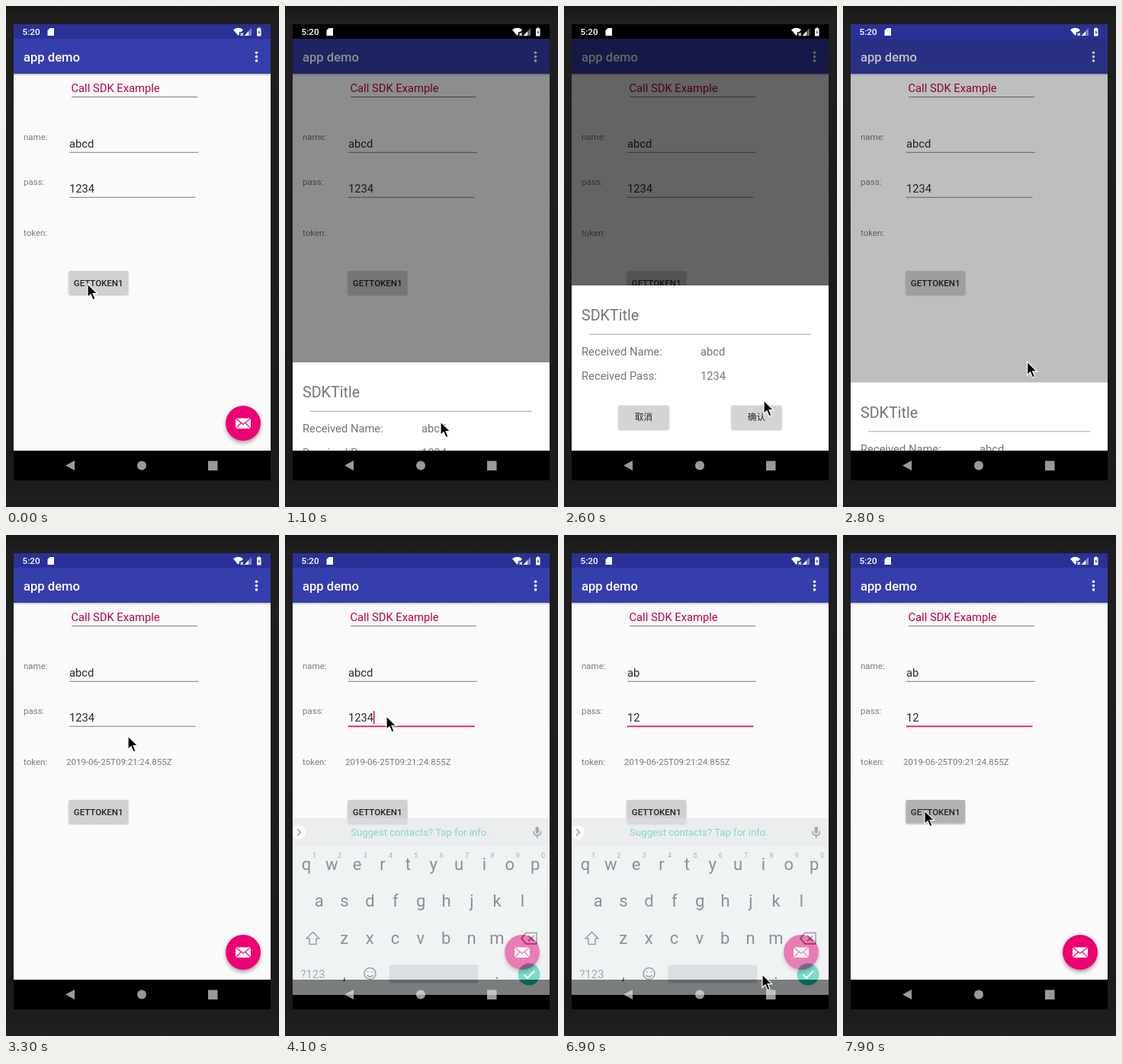
Recreate the animation shown at these times as an HTML page. Size 358 by 658 pixels, loop 8 s.

```html
<!DOCTYPE html>
<html lang="en">
<head>
<meta charset="utf-8">
<title>app demo</title>
<style>
  html, body { margin: 0; width: 100%; height: 100%; overflow: hidden; background: #1c1c1c; }
  svg { display: block; width: 100vw; height: 100vh; font-family: Roboto, sans-serif; }
  .edit { font-size: 14.76px; fill: #2b2b2b; }
  .label { font-size: 11.5px; fill: #7b7b7b; }
  .cap { font-size: 11.5px; font-weight: 500; fill: #222; text-anchor: middle; }
  .cjk { font-family: "Noto Sans CJK SC", "Noto Sans CJK", sans-serif; }
  .row { font-size: 14.76px; fill: #757575; }
  .line { stroke: #7d7d7d; stroke-width: 1; }
  .line.on { stroke: #d0155c; stroke-width: 1.7; }
  .key { font-size: 22px; fill: #263238; text-anchor: middle; }
  .hint { font-size: 9px; fill: #5f6b71; text-anchor: middle; }
  .word { font-size: 14.76px; fill: #56626a; text-anchor: middle; }
  .icon { fill: none; stroke: #435058; stroke-width: 1.5; stroke-linejoin: round; stroke-linecap: round; }
</style>
</head>
<body>
<svg viewBox="0 0 358 658" preserveAspectRatio="none">
  <defs>
    <linearGradient id="case" x2="0" y2="1">
      <stop offset="0" stop-color="#181818"/><stop offset=".03" stop-color="#1f1f1f"/>
      <stop offset=".94" stop-color="#1b1b1b"/><stop offset="1" stop-color="#202020"/>
    </linearGradient>
    <linearGradient id="fall" x2="0" y2="1">
      <stop offset="0" stop-opacity=".22"/><stop offset="1" stop-opacity="0"/>
    </linearGradient>
    <filter id="soft" x="-30%" y="-30%" width="160%" height="170%">
      <feDropShadow dx="0" dy="1" stdDeviation=".8" flood-opacity=".35"/>
    </filter>
    <filter id="lift" x="-30%" y="-30%" width="160%" height="170%">
      <feDropShadow dx="0" dy="3" stdDeviation="2.4" flood-opacity=".35"/>
    </filter>
    <clipPath id="screen"><path d="M10 24H347V623H10Z"/></clipPath>
    <clipPath id="page"><path d="M10 24H347V584H10Z"/></clipPath>
  </defs>
  <rect width="358" height="658" fill="url(#case)"/>

  <g clip-path="url(#page)">
    <rect x="10" y="89" width="337" height="495" fill="#fafafa"/>
    <rect x="10" y="89" width="337" height="3" fill="url(#fall)"/>
    <rect x="10" y="43" width="337" height="46" fill="#363eac"/>
    <text x="23" y="72.6" font-size="16.6" font-weight="500" fill="#fff">app demo</text>
    <g fill="#fff"><circle cx="328.5" cy="61.3" r="1.8"/><circle cx="328.5" cy="66.6" r="1.8"/><circle cx="328.5" cy="71.9" r="1.8"/></g>

    <text class="edit" x="85.5" y="113" style="fill:#b8004a">Call SDK Example</text>
    <path class="line" d="M86 119.5H251"/>
    <text class="label" x="23" y="176">name:</text>
    <text class="label" x="23" y="235">pass:</text>
    <text class="label" x="23" y="302">token:</text>
    <text class="edit" id="name" x="83" y="186"></text>
    <path class="line" id="nameLine" d="M83 192.3H252"/>
    <path id="compose" d="M83 188.5H99" stroke="#333"/>
    <text class="edit" id="pass" x="83" y="245"></text>
    <path class="line" id="passLine" d="M83 251.3H248.500"/>
    <path id="caret" d="M0 0V17" stroke="#d0155c" stroke-width="1.6"/>
    <text class="label" id="token" x="79" y="302">2019-06-25T09:21:24.855Z</text>

    <rect id="get" x="82.500" y="348" width="77.500" height="30.500" rx="1.500" filter="url(#soft)"/>
    <text class="cap" x="121.200" y="367.500">GETTOKEN1</text>

    <g filter="url(#lift)"><circle cx="311" cy="548" r="23" fill="#ec0673"/></g>
    <path d="M301 541.500H321V555H301Z" fill="#fff"/>
    <path d="M301 541.500L311 549.500L321 541.500M301 555L308.300 547.500M321 555L313.700 547.500" fill="none" stroke="#ec0673" stroke-width="1.100"/>

    <rect id="dim" x="10" y="43" width="337" height="541"/>
    <g id="sheet">
      <rect x="10" width="337" height="220" fill="#fff"/>
      <text x="23" y="46" font-size="19.700" fill="#757575">SDKTitle</text>
      <path d="M33 64.300H324" stroke="#a3a3a3"/>
      <text class="row" x="23" y="92">Received Name:</text><text class="row" x="179" y="92">abcd</text>
      <text class="row" x="23" y="124">Received Pass:</text><text class="row" x="179" y="124">1234</text>
      <g filter="url(#soft)">
        <rect x="71.500" y="157.500" width="66" height="31" rx="1.500" fill="#d4d4d4"/>
        <rect id="ok" x="219.500" y="157.500" width="66" height="31" rx="1.500"/>
      </g>
      <text class="cap cjk" x="104.500" y="177">取消</text><text class="cap cjk" x="252.500" y="177">确认</text>
    </g>
    <rect id="status" x="10" y="24" width="337" height="19"/>
    <g fill="#fff">
      <text x="21.500" y="38" font-size="11.700" font-weight="500">5:20</text>
      <path d="M57.500 29H63V39H54.500V32Z"/>
      <path d="M298 31.200Q304.500 26.300 311 31.200L308.800 34H306V37L304.500 39Z"/>
      <path d="M307.500 35.500L311 39M311 35.500L307.500 39" stroke="#fff" stroke-width="1.100"/>
      <path d="M322 29V39H312.500Z" opacity=".4"/><path d="M318 33.200V39H312.500Z"/>
      <path d="M330.500 28.500H333V29.500H334.500V39.500H329V29.500H330.500Z"/>
    </g>
    <path d="M332.300 31.500L330.500 35H331.600V37.500L333.300 34H332.200Z" fill="#2a3196"/>
  </g>

  <rect x="10" y="584" width="337" height="39"/>
  <g fill="#9a9a9a">
    <path id="back" d="M78 603.500L90 597V610Z"/>
    <circle cx="178" cy="603.500" r="6"/><rect x="265" y="597.500" width="12.500" height="12.500"/>
    <path id="imeIcon" d="M312.500 601H325M312.500 603.500H325M314.500 606.500H323" fill="none" stroke="#9a9a9a" stroke-width="1.500" stroke-dasharray="1.500 1.200"/>
  </g>

  <g clip-path="url(#screen)">
    <g id="board">
      <rect x="10" y="352" width="337" height="232" fill="#e8edf0"/>
      <rect x="10" y="352" width="337" height="36.500" fill="#dee3e6"/>
      <circle cx="18" cy="370.500" r="9.500" fill="#fff"/>
      <path class="icon" d="M16.500 366.500L20.500 370.500L16.500 374.500"/>
      <g id="words">
        <text class="word" x="84" y="376">ab</text><text class="word" x="177" y="376">about</text><text class="word" x="270.500" y="376">AB</text>
        <path d="M128.500 361V380M226.500 361V380" stroke="#bfc6ca"/>
      </g>
      <text id="tip" x="177" y="375" font-size="13.100" text-anchor="middle" fill="#12b89b">Suggest contacts? Tap for info.</text>
      <rect x="328.500" y="363" width="4.500" height="9" rx="2.200" fill="#56626a"/>
      <path class="icon" d="M326 369.500Q326 374.500 330.700 374.500Q335.500 374.500 335.500 369.500M330.700 374.500V377.500"/>
      <g id="keys"></g>
      <path class="icon" d="M36.500 501.500L45 510H41V517.500H32V510H28Z"/>
      <path class="icon" d="M310 509.800L316 502.500H330V517H316ZM319.500 506.500L326 513M326 506.500L319.500 513"/>
      <circle class="icon" cx="111.500" cy="556" r="7.500"/>
      <path class="icon" d="M108 558.500Q111.500 562 115 558.500M108.800 553.800V554M114.200 553.800V554"/>
      <rect x="136.500" y="544.500" width="117" height="24" rx="2.500" fill="#c3c8cb"/>
      <circle cx="320" cy="557" r="14.500" fill="#13bf9f"/>
      <path id="enter" fill="none" stroke="#fff" stroke-width="1.900"/>
    </g>
  </g>
  <path id="mouse" d="M0 0V17.500L4 13.800L7 20.800L10 19.500L7.100 12.700H12.700Z" fill="#000" stroke="#fff" stroke-width="1.200"/>
</svg>
<script>
const $ = id => document.getElementById(id);
const LOOP = 8000, STEP = 100;

// Each step: [time, value, ...]
const SHEET = [[900, 584], [1000, 535], [1100, 468], [1200, 400], [1300, 367], [2600, 367], [2700, 405], [2900, 584]];
const DIM = [[900, 0], [1100, .44], [1300, .6], [2600, .6], [2700, .48], [2900, 0]];
const BOARD = [[4000, 0], [4200, 1], [6800, 1], [7000, 0]];
const MOUSE = [
  [500, 107, 365], [900, 185, 527], [1100, 204, 546], [1600, 262, 518], [2700, 262, 518],
  [3200, 160, 264], [3600, 160, 264], [3900, 133, 238], [4900, 133, 238], [5100, 137, 186],
  [5600, 137, 186], [6100, 317, 551], [6700, 317, 551], [6900, 260, 577], [7200, 238, 548], [7700, 107, 362]
];

function at(steps, t) {
  const n = steps.findIndex(s => s[0] > t);
  if (n < 0) return steps.at(-1).slice(1);
  if (n === 0) return steps[0].slice(1);
  const a = steps[n - 1], b = steps[n], k = (t - a[0]) / (b[0] - a[0]);
  return a.slice(1).map((v, i) => v + (b[i + 1] - v) * k);
}

function key(x, y, text, cls = 'key') {
  const el = document.createElementNS('http://www.w3.org/2000/svg', 'text');
  el.setAttribute('x', x);
  el.setAttribute('y', y);
  el.setAttribute('class', cls);
  el.textContent = text;
  $('keys').append(el);
}
[['qwertyuiop', 28, 419.5], ['asdfghjkl', 44.7, 468], ['zxcvbnm', 77.8, 516.5]].forEach(([row, x, y], r) => {
  [...row].forEach((c, i) => {
    key(x + i * 33.35, y, c);
    if (!r) key(x + 10.5 + i * 33.35, 403.5, (i + 1) % 10, 'hint');
  });
});
key(36.5, 561.5, '?123', 'word');
key(78, 563, ',');
key(278, 563, '.');

const show = (id, on) => $(id).style.display = on ? '' : 'none';
const set = (id, name, value) => $(id).setAttribute(name, value);
const between = (t, a, b) => t >= a && t < b;

function draw(t) {
  const onName = between(t, 5000, 6200), onPass = t >= 4000 && !onName;
  const name = 'abcd'.slice(0, t < 5200 ? 4 : t < 5300 ? 3 : 2);
  const pass = '1234'.slice(0, t < 4600 ? 4 : t < 4700 ? 3 : 2);
  $('name').textContent = name;
  $('pass').textContent = pass;
  $('nameLine').classList.toggle('on', onName);
  $('passLine').classList.toggle('on', onPass);
  show('compose', onName);
  set('compose', 'd', `M83 188.500H${83 + name.length * 8.1}`);
  show('caret', (onName || onPass) && Math.floor(t / 500) % 2 === 0);
  const end = onName ? name.length * 8.1 : pass.length * 8.3;
  set('caret', 'transform', `translate(${83.5 + end} ${onName ? 172 : 231})`);
  show('token', t >= 2900);
  set('get', 'fill', between(t, 500, 800) || t >= 7800 ? '#b2b2b2' : '#d0d0d0');

  set('status', 'fill', between(t, 900, 2800) ? '#000' : '#2a3196');
  set('dim', 'opacity', at(DIM, t));
  set('sheet', 'transform', `translate(0 ${at(SHEET, t)})`);
  set('ok', 'fill', t >= 2700 ? '#b8b8b8' : '#d4d4d4');

  const [up] = at(BOARD, t);
  set('board', 'opacity', up * (1.1 - .1 * up));
  set('board', 'transform', `translate(0 ${(1 - up) * 40})`);
  show('board', up > 0);
  show('words', onName);
  show('tip', !onName);
  set('enter', 'd', onName ? 'M311.500 557H324M319.500 552.500L324 557L319.500 561.500M328 551.500V562.500' : 'M313.500 557.500L318 562L327 552.500');
  set('back', 'transform', up > .6 ? 'rotate(-90 84 603.500)' : '');
  show('imeIcon', up > .6);

  set('mouse', 'transform', `translate(${at(MOUSE, t).join(' ')})`);
}

const start = performance.now();
function tick() {
  const t = (performance.now() - start) % LOOP;
  draw(Math.floor(t / STEP) * STEP);
  requestAnimationFrame(tick);
}
tick();
</script>
</body>
</html>
```
